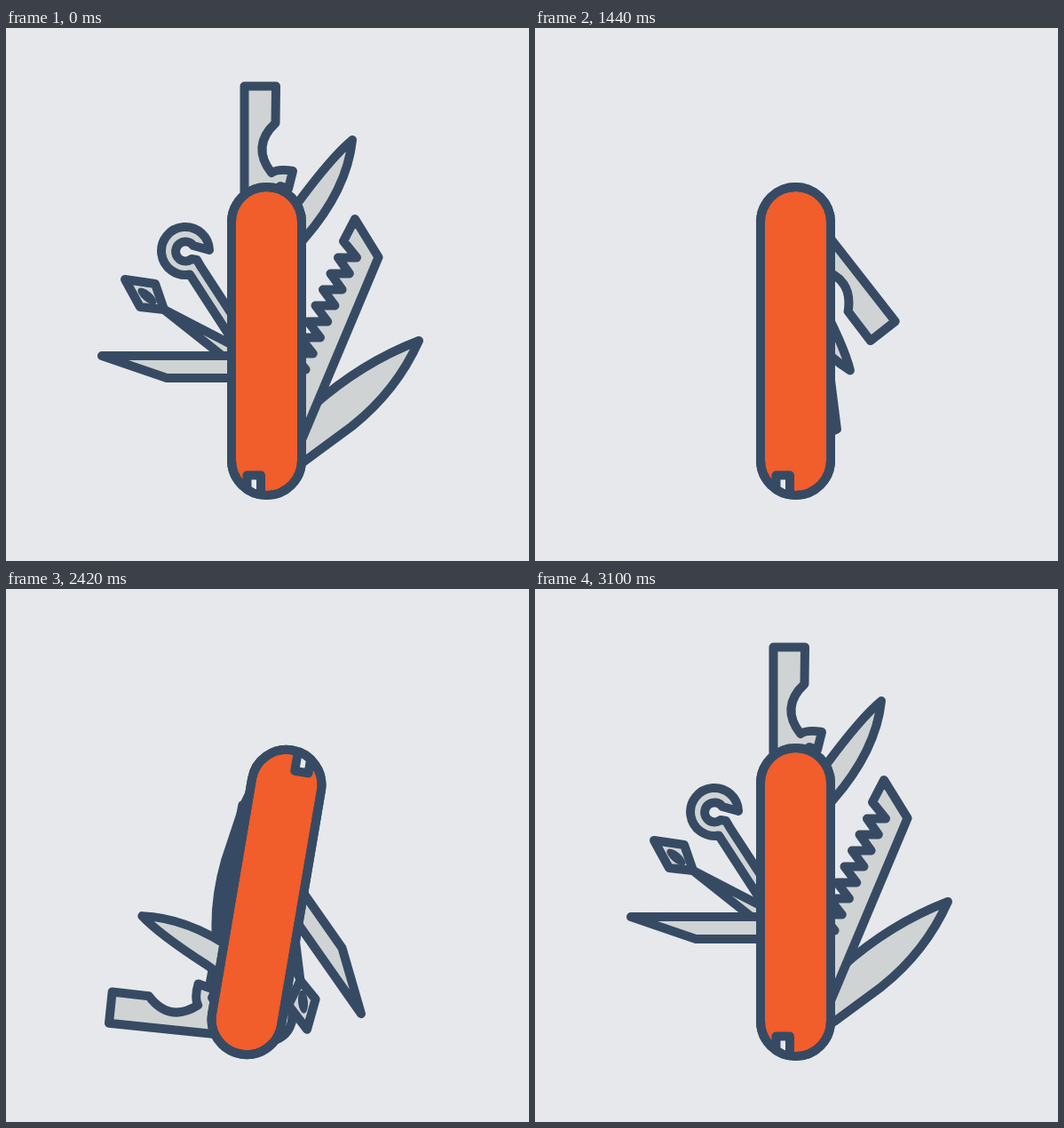
Recreate the animation shown at these times as an HTML page. Size 589 by 600 pixels, loop 3140 ms.

```html
<!DOCTYPE html>
<html lang="en">
<head>
<meta charset="utf-8">
<title>Pocket knife</title>
<style>
  html, body { margin: 0; width: 100%; height: 100%; overflow: hidden; background: #e6e8ec; }
  svg { display: block; width: 589px; height: 600px; }
  path, rect { stroke: #364b63; stroke-width: 10; stroke-linejoin: round; stroke-linecap: round; }
  path { fill: #d0d3d4; }
  .handle { fill: #f15d2b; }
  .notch { fill: #e6e8ec; }
  .outline { fill: none; }
  .slot { fill: #364b63; }
</style>
</head>
<body>
<svg viewBox="0 0 589 600">
  <g id="knife">
    <g id="blade"><path d="M310 453L345 426Q400 377 465 352Q440 408 390 448L337 487L306 504Z"/></g>
    <g id="saw"><path id="sawShape"/></g>
    <g id="pen"><path d="M310 219L330 195Q368 144 390 126Q384 182 336 237L320 256Z"/></g>
    <g id="opener"><path d="M268.5 245V65.5H304L303.5 107C284 125 284 144 299 163Q307 158 323 161L318 181L309 178Q303 182 303 200V245Z"/></g>
    <g id="hook"><path d="M229 250A27 27 0 1 0 207 277.5L278 387L290 377L219 268L215 261L209 260A11 11 0 1 1 211 245Z"/></g>
    <g id="driver">
      <path d="M290 375L178 317L280 398Z"/>
      <path d="M134 283L168 288L178 317L151 314Z"/>
      <ellipse class="slot" cx="159" cy="302" rx="13" ry="5.5" transform="rotate(40 159 302)"/>
    </g>
    <g id="file"><path d="M290 369H108L181 394H290Z"/></g>
    <rect class="handle" x="254" y="179" width="79" height="347" rx="39.5"/>
    <path class="notch" d="M271.5 518V503.5H287V525"/>
    <rect class="outline" x="254" y="179" width="79" height="347" rx="39.5"/>
  </g>
</svg>
<script>
const LOOP = 3140;
const $ = id => document.getElementById(id);

// id, pivot x, pivot y, folded angle, fold [start, length], unfold [start, length]
const tools = [
  ['blade', 299, 471, -65, [975, 934], [2323, 838]],
  ['saw', 309, 444, -31, [1002, 640], [2335, 800]],
  ['pen', 290.5, 244.6, 131, [1008, 850], [2286, 816]],
  ['opener', 291.5, 221.5, 180, [1072, 910], [2233, 860]],
  ['hook', 294.6, 393.6, 36, [972, 660], [2319, 855]],
  ['driver', 281.5, 395.3, 58, [1005, 598], [2288, 846]],
  ['file', 284.5, 379, 95, [1010, 737], [2232, 860]]
];
const spin = [2239, 820];

function sawPath() {
  let d = 'M393 215L380 240';
  for (let i = 0; i < 8; i++) {
    const y = 258.5 + 18 * i;
    d += `L${395 - 8.2 * i} ${y}L${374 - 8.5 * i} ${y}`;
  }
  return d + 'L300 440L302 462L332 466L340 447L419.5 258Z';
}

// Cubic ease-out progress of a [start, length] span
function ease(t, [start, length]) {
  const u = Math.min(1, Math.max(0, (t - start) / length));
  return 1 - (1 - u) ** 3;
}

function turn(id, angle, x, y) {
  $(id).setAttribute('transform', `rotate(${angle.toFixed(3)} ${x} ${y})`);
}

function draw(now) {
  // The motion advances in 40 ms steps
  const ms = now % LOOP;
  const phase = ms < 2000 ? 0 : 20;
  const t = Math.floor((ms - phase) / 40) * 40 + phase;

  for (const [id, x, y, folded, fold, unfold] of tools) {
    turn(id, folded * (ease(t, fold) - ease(t, unfold)), x, y);
  }
  turn('knife', 360 * ease(t, spin), 293.5, 352.5);
}

$('sawShape').setAttribute('d', sawPath());
const begin = performance.now();
function tick() {
  draw(performance.now() - begin);
  requestAnimationFrame(tick);
}
tick();
</script>
</body>
</html>
```
